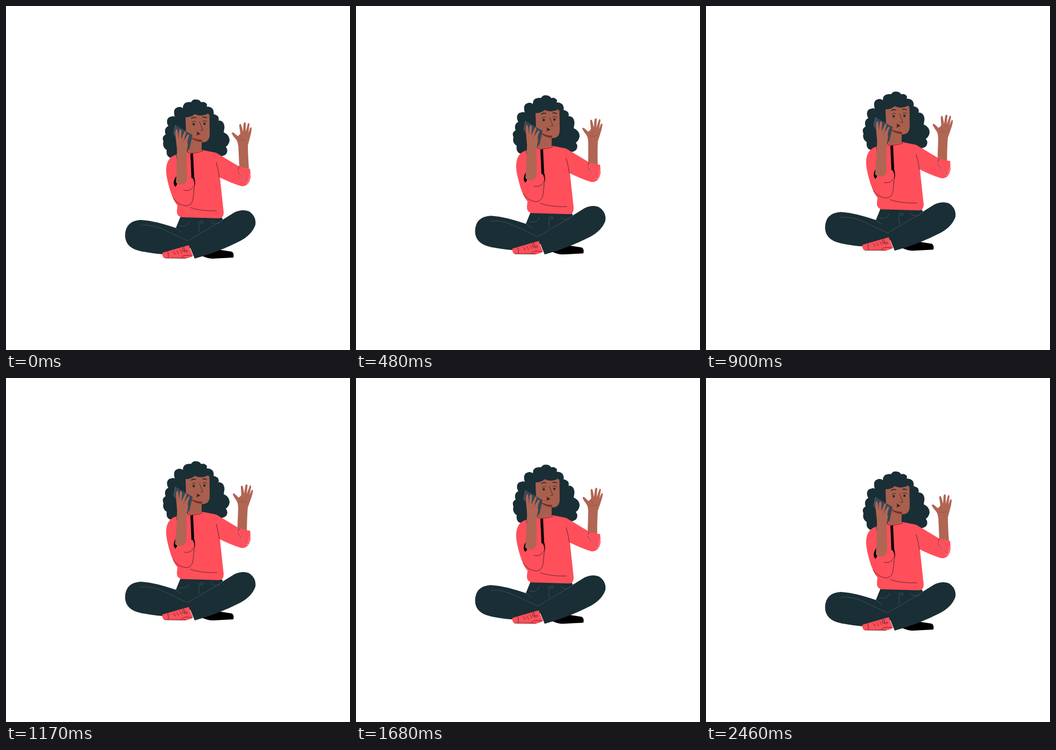
Write an HTML page that moves like this. It is 640 px wide and 640 px high and loops after 2520 ms.

```html
<!DOCTYPE html>
<html lang="en">
<head>
<meta charset="utf-8">
<title>Phone call</title>
<style>
html, body { margin: 0; width: 100%; height: 100%; overflow: hidden; background: #fff; }
svg { display: block; width: 100vw; height: 100vh; }
.dark { fill: #1a2e35; }
.skin { fill: #b16553; }
.face { fill: #a85f4d; }
.red { fill: #ff4f5a; }
.ink, .seam, .light, .crease { fill: none; stroke-linecap: round; stroke-linejoin: round; }
.ink { stroke: #20191d; stroke-width: .7; }
.seam { stroke: #587079; stroke-width: .5; }
.light { stroke: #ffc4c6; stroke-width: .6; }
.crease { stroke: #7a3f33; stroke-width: .5; }
</style>
</head>
<body>
<svg viewBox="0 0 640 640">
<g id="figure">
  <!-- hair -->
  <path class="dark" d="M308 283Q297 281 299 268Q290 262 293 252Q289 243 297 239Q293 228 302 223C297 216 300 206 307 206Q311 204 314 206Q310 192 318 189Q324 186 329 190Q329 180 338 179Q342 178 344 179Q348 173 354 174Q360 174 363 179Q370 177 374 183Q374 186 373 187Q384 187 386 195Q387 199 386 201Q396 203 396 211L395 213C403 212 408 220 406 229L405 235Q416 240 416 250Q415 258 409 262Q414 268 410 275Q403 282 392 278L366 274L340 276Z"/>

  <!-- waving arm -->
  <g id="wave">
    <path class="skin" d="M432 256Q433 276 434 300L452 303Q450 278 450 258Z"/>
    <path class="skin" d="M432 260Q431 251 427 247Q421 240 420 237Q420 234 424 236L431 242Q434 241 436 237L434 223Q434 218 437 220Q439 225 441 234L442 219Q444 214 446 218L446 234L450 219Q452 216 453 220L451 236L454 227Q456 224 457 227Q457 233 454 244Q452 252 450 259Z"/>
    <path class="crease" d="M435 249Q440 252 447 248M437 244L440 247"/>
  </g>

  <!-- face -->
  <path class="face" d="M340 238L364 245V269Q352 277 338 271Z"/>
  <path class="face" d="M334 207Q345 207 351 201Q362 207 376 200L378.5 203L379 238Q379 254 365 253.5Q349 251 335 237Z"/>
  <path fill="#7c2d20" d="M340 241Q351 249 365 249L364 253Q349 252 340 241Z"/>
  <path fill="none" stroke="#1a2e35" stroke-width="1.6" stroke-linecap="round" d="M345 209Q349 206 353 208M366 207Q369 206 373 208"/>
  <path class="ink" d="M346 216Q349 213 353 215M366 214Q370 212 374 215M360 215Q363 223 366 230Q367 232 362 231"/>
  <ellipse class="dark" cx="349.3" cy="220" rx="2.1" ry="2.4"/>
  <ellipse class="dark" cx="369.2" cy="219" rx="2.1" ry="2.4"/>
  <path fill="#50201e" d="M354 233L362 238L354 241Q357 237 354 233Z"/>

  <!-- far shoe and legs -->
  <path d="M365 465L394 453L420 457Q425 460 423 468L385 470Q375 470 365 465Z"/>
  <path class="dark" d="M325 391L402 394L405 401L345 450L292 462Q268 460 250 456Q222 450 221.5 427Q222 400 250 398Q275 399 316 413Z"/>
  <path class="red" d="M291 459L340 445L348 465Q340 469 334 470L294 469Q290 465 291 459Z"/>
  <path class="dark" d="M338 438L425 384Q440 377 452 382Q466 391 464 407Q458 425 436 437Q395 458 351 470Z"/>
  <path class="seam" d="M251 408Q272 405 300 419Q318 428 338 437L404 398M316 413L327 421M323 409Q337 413 341 401M359 401Q358 412 360 420M381 400Q385 408 397 404"/>
  <circle class="seam" cx="364" cy="402" r="2.5"/>
  <path class="ink" d="M301 457Q303 463 302 468M311 457Q314 458 315 462M317 455Q320 457 321 461M323 453Q326 455 327 459M329 456Q327 450 331 449Q333 452 331 456Q338 452 338 456Q336 459 331 456M326 468Q332 461 345 465M296 469L334 469"/>

  <!-- sweater -->
  <path class="red" d="M337 271Q352 274 366 268L391 273Q401 279 431 297Q442 302 454 303Q455 311 455 318Q452 337 437 335Q418 329 398 319L405 384Q405 395 396 395L326 393Q317 390 318 381L319 371Q310 361 303 335Q297 313 298 303Q299 281 318 276Z"/>
  <path class="ink" d="M338 273Q352 275 366 270M391 291Q395 304 397 319M343 375Q362 382 392 381M434 299Q430 304 433 309L448 327"/>
  <path class="light" d="M431 304L449 330Q453 322 454 312"/>

  <!-- arm with phone -->
  <path d="M343 275L348 274L350 318Q354 330 349 343L345 320ZM318 315Q312 322 312 330Q313 336 318 338Z"/>
  <path class="red" d="M316 334Q326 333 335 322Q341 318 348 321Q353 331 349 343L348 358Q346 371 336 372Q320 371 313 359Z"/>
  <path class="ink" d="M311 357Q320 371 336 372Q347 370 348 358L350 340M331 343Q344 346 350 334Q352 328 348 321M316 276Q318 279 318 284"/>
  <path fill="#364755" d="M315 221L347 240L341 267L332 266L312 239Z"/>
  <path fill="none" stroke="#637380" stroke-width=".8" d="M315 222L312 239"/>
  <g id="hold">
    <path class="skin" d="M318 266L315.5 243Q314 229 318 229Q320 232 321 247L322 232Q324 227 326.5 232L326 248L332 234Q335 232 335 236L330.5 251L338 239Q341 238 340.5 242Q336 252 338.5 258Q337 264 336 278L337 323Q334 332 325 332Q319 332 316 328Q318 300 318 266Z"/>
    <path class="crease" d="M331 250L329 254"/>
  </g>
</g>
</svg>
<script>
const LOOP = 2520, HALF = 1230, STEP = 30, RISE = 20;
const [figure, wave, hold] = ['figure', 'wave', 'hold'].map(id => document.getElementById(id));
const turn = (el, angle, x, y) => el.setAttribute('transform', `rotate(${angle} ${x} ${y})`);

function draw(now) {
  const t = Math.floor(now % LOOP / STEP) * STEP;
  // up, down, then a short rest
  const lift = Math.max(0, 1 - Math.abs(t - HALF) / HALF);
  const swing = Math.sin(lift * Math.PI / 2);
  figure.setAttribute('transform', `translate(0 ${-RISE * lift})`);
  turn(wave, 4.9 * swing, 440, 258);
  turn(hold, 1.8 * swing, 327, 275);
}

const start = performance.now();
function tick() {
  draw(performance.now() - start);
  requestAnimationFrame(tick);
}
tick();
</script>
</body>
</html>
```
